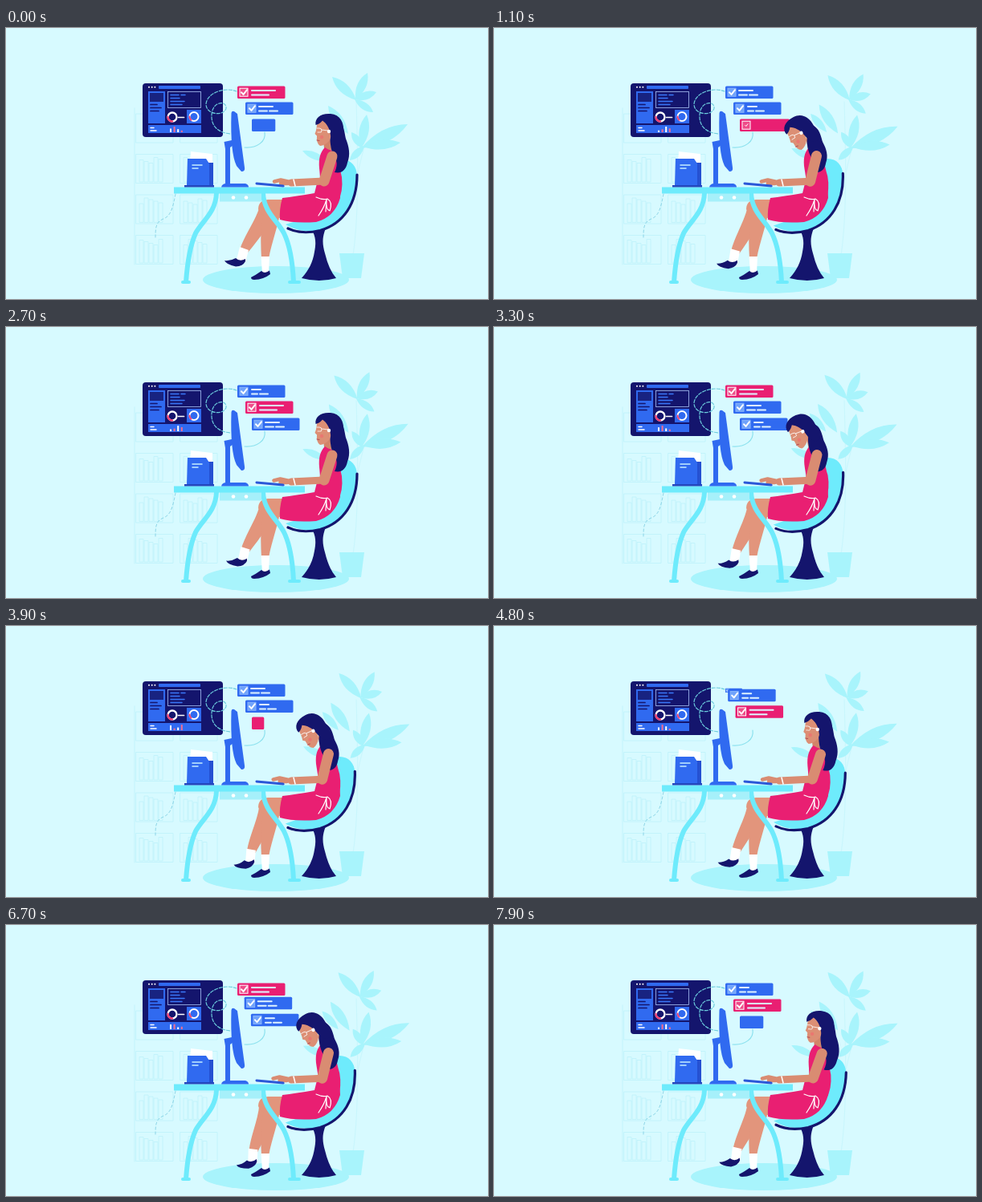
Recreate the animation shown at these times as an HTML page. Size 600 px wide and 338 px high, loop 8000 ms.

```html
<!DOCTYPE html>
<html lang="en">
<head>
<meta charset="utf-8">
<title>Working at a desk</title>
<style>
html, body { margin: 0; width: 100%; height: 100%; overflow: hidden; background: #d7faff; }
svg { display: block; width: 100vw; height: 100vh; }
.navy { fill: #14156d; }
.blue { fill: #306af0; }
.pink { fill: #e91f72; }
.skin { fill: #dc8f75; }
.shin { fill: #e2957c; }
.cyan { fill: #6eebfc; }
.pale { fill: #a8f4fc; }
.white { fill: #fff; }
.line { fill: none; stroke-linecap: round; stroke-linejoin: round; }
.limb { stroke: #d98c72; }
</style>
</head>
<body>
<svg viewBox="0 0 600 338" preserveAspectRatio="none">
  <g id="shelves" class="line" stroke="#bdf2fa" stroke-width=".8"></g>
  <path class="line" d="M211 207C208 222 206 234 196 238S186 250 186 264" stroke="#80cfe2" stroke-width=".9" stroke-dasharray="3 3"/>

  <!-- plant -->
  <ellipse class="pale" cx="336" cy="314" rx="91" ry="17"/>
  <path class="line" d="M432 284C438 240 439 190 436 92M434 200Q440 170 446 148" stroke="#c8f6fd"/>
  <path class="pale" d="M415 281h31l-4 31h-23z"/>
  <g id="topLeaves" class="pale"></g>
  <g id="lowLeaves" class="pale"></g>

  <!-- window -->
  <rect class="navy" x="170" y="69" width="100" height="67" rx="4"/>
  <g class="white"><circle cx="178" cy="73.700" r="1"/><circle cx="181.700" cy="73.700" r="1"/><circle cx="185.400" cy="73.700" r="1"/></g>
  <rect class="blue" x="190" y="72" width="52" height="4" rx="1"/>
  <rect class="blue" x="177" y="79" width="21" height="40"/>
  <rect x="179" y="81" width="17" height="11" fill="#182381"/>
  <path class="line" d="M180 95.500h8M180 99.500h13M180 103.500h10" stroke="#14156d" stroke-width="1.700"/>
  <rect class="navy" x="201.500" y="79.500" width="41" height="20" stroke="#a8c3f7" stroke-width=".8"/>
  <path class="line" d="M205 83.500h10M218 83.500h5M205 87.500h11M205 91.500h17M205 95.500h14" stroke="#3978fa" stroke-width="1.500"/>
  <g class="line" stroke-width="2.300">
    <circle cx="207" cy="111" r="5.500" stroke="#fff"/>
    <path d="M201.500 111a5.500 5.500 0 0 0 5.500 5.500" stroke="#f03b72"/>
    <path d="M214.500 111.500h7" stroke="#fff" stroke-width="1.700"/>
  </g>
  <rect class="blue" x="225" y="102" width="18" height="17"/>
  <circle cx="234" cy="110.500" r="5.500" class="line" stroke="#fff" stroke-width="2"/>
  <path class="line" d="M228.500 110.500a5.500 5.500 0 0 0 2 4.200" stroke="#f03b72" stroke-width="2"/>
  <rect class="blue" x="177" y="121" width="66" height="10"/>
  <path class="line" d="M180 124.500h4M180 128h7" stroke="#fff" stroke-width="1.500"/>
  <g id="bars"></g>

  <path class="line" d="M287 79C272 73 250 81 249 95C249 109 272 110 274 100C275 90 257 91 256 108C255 124 266 131 280 132" stroke="#6bcbdc" stroke-width="1.200" stroke-dasharray="4 2"/>
  <path class="line" d="M297 149C312 150 324 142 322 130" stroke="#8ce1ee" stroke-width="1.200"/>
  <g id="tasks"></g>

  <!-- chair and woman -->
  <path class="navy" d="M380 250H398C393 262 394 270 397 281Q402 302 411 312Q390 318 368 312C377 302 382 292 384 279C386 268 386 261 380 250Z"/>
  <g id="chair">
    <path class="cyan" d="M416 164C429 163 437 172 437 185C436 218 420 245 391 252C376 255 361 253 348 245L390 232Z"/>
    <path class="line" d="M437 183C437 219 420 244 391 252.500Q368 258 351 250" stroke="#14156d" stroke-width="3.200"/>
  </g>
  <g id="shin">
    <path class="shin" d="M316 222C311 240 298 256 291 276L301 280C316 262 327 248 332 230Z"/>
    <path class="white" d="M291 273L302 277L298 292L287 289Z"/>
    <path class="navy" d="M272 290Q279 291 286 287Q291 292 298 288V291Q295 297 286 297.500Q274 295 272 290Z"/>
  </g>
  <path class="shin" d="M346 214H326Q314 215 314 226Q318 236 330 235L346 238Z"/>
  <path class="shin" d="M322 226C316 248 317 268 318 288H327C330 270 337 252 341 232Z"/>
  <path class="white" d="M317.500 285H328L327 306H319Z"/>
  <path class="navy" d="M305 311Q311 308 318 303Q322 307 328 302.500L329 307Q321 313.500 309 314Q305 314 305 311Z"/>
  <path class="pink" d="M384 206Q360 210 344 212Q340 226 341 239Q358 244 386 242Q409 236 416 212L415 190L388 190Z"/>
  <g id="torso">
    <path class="line" d="M399 138L401 153" stroke="#d28469" stroke-width="9"/>
    <path class="pink" d="M397 149Q406 155 410 152C415 160 415 174 418 186Q420 204 413 217H385C393 202 391 185 390 175C389 163 391 155 397 149Z"/>
    <path id="tail" class="navy" d="M408 112C420 114 421 128 423 138C427 148 429 158 425 168C423 178 417 182 409 180Q413 172 411 165C405 158 402 140 404 130Z"/>
    <g id="head">
      <path class="skin" d="M389 113C386 122 387 127 384.500 132L387 134.500Q386 144 391 147Q397 147 403 140L407 126L400 113Z"/>
      <path class="navy" d="M385.500 121C384 112 392 106 404 107C416 108 421 118 420 129Q423 141 416 147C408 150 405 142 404 134C403 125 399 119 394 115.500Q390 120 385.500 121Z"/>
      <path class="line" d="M387 125h3q3 0 3 3t-3 2h-2M393 127L401 128" stroke="#fff" stroke-width=".8"/>
      <circle class="white" cx="402" cy="129" r="2.200"/>
      <path class="line" d="M387 140l3 .5" stroke="#b44b55"/>
      <circle cx="393" cy="136" r="2.200" fill="#ea7770"/>
    </g>
  </g>
  <path id="upperArm" class="line limb" stroke-width="13"/>
  <path id="foreArm" class="line limb" stroke-width="9"/>
  <path id="hand" class="line limb" d="M358 193L342 189.500L334 191.500M351 194H342" stroke-width="4.500"/>
  <path class="line" d="M358 189L360 197" stroke="#fff" stroke-width="1.500"/>
  <path class="line" d="M386 211Q395 215 400 213Q407 217 403 228Q398 227 399 214Q396 224 389 234M399 214L398 229" stroke="#fff" stroke-width="1.200"/>

  <!-- desk -->
  <path class="line" d="M262 206C261 230 245 240 236 256Q227 276 224 317M320 206C321 230 338 240 346 256Q356 276 358 317" stroke="#6eebfc" stroke-width="6" style="stroke-linecap:butt"/>
  <rect class="cyan" x="218" y="315" width="12" height="4" rx="2"/>
  <rect class="cyan" x="351" y="315" width="16" height="4" rx="2"/>
  <rect x="266" y="205" width="52" height="11.500" fill="#a6f0fa"/>
  <circle class="white" cx="283" cy="211.500" r="2.300"/><circle class="white" cx="299" cy="211.500" r="2.300"/>
  <rect class="cyan" x="209" y="198.500" width="163" height="8"/>
  <path class="white" d="M230 154L257 157V170H229Z"/>
  <path d="M250 168H258V197H250Z" fill="#2550d2"/>
  <path class="blue" d="M226 163H249L253 169V197H225Z"/>
  <rect x="222" y="196" width="37" height="2.500" fill="#2447bd"/>
  <path class="line" d="M232 171h12M232 175h7" stroke="#c4eeff" stroke-width="1.500"/>
  <path class="blue" d="M271.500 142L281 140L283 146L279 149V195H273V151Z"/>
  <path class="blue" d="M280.500 106Q281 103 284 104L288 107L297 174Q298 179 293 179L287 172Q279 156 280.500 106Z"/>
  <path class="blue" d="M268 198.500Q269 194 274 194H298Q302 195 302 198.500Z"/>
  <path class="line" d="M312 194L345 197" stroke="#2b58d8" stroke-width="3"/>
</svg>
<script>
const $ = id => document.getElementById(id);
const LOOP = 8000, STEP = 987.5, SHIFT = -255;
const clamp = v => Math.min(1, Math.max(0, v));
const smooth = v => (v = clamp(v), v * v * (3 - 2 * v));
const linear = v => v;
const set = (id, value, attr = 'transform') => $(id).setAttribute(attr, value);

// Interpolate through alternating times and values.
function key(t, list, ease = smooth) {
  if (t <= list[0]) return list[1];
  for (let i = 2; i < list.length; i += 2) {
    if (t <= list[i]) {
      const k = ease((t - list[i - 2]) / (list[i] - list[i - 2]));
      return list[i - 1] + (list[i + 1] - list[i - 1]) * k;
    }
  }
  return list[list.length - 1];
}

function leaf(x, y, tx, ty, w) {
  const d = Math.hypot(tx - x, ty - y), nx = (y - ty) / d * w, ny = (tx - x) / d * w;
  const mx = x + (tx - x) * .55, my = y + (ty - y) * .55;
  return `<path d="M${x} ${y}Q${mx + nx} ${my + ny} ${tx} ${ty}Q${mx - nx} ${my - ny} ${x} ${y}"/>`;
}
$('topLeaves').innerHTML = leaf(436, 90, 406, 61, 12) + leaf(435, 89, 450, 56, 11) +
  leaf(434, 89, 461, 80, 10) + leaf(434, 89, 457, 105, 9);
$('lowLeaves').innerHTML = leaf(442, 150, 449, 108, 12) + leaf(442, 150, 500, 120, 15) +
  leaf(444, 148, 491, 143, 12) + leaf(444, 150, 430, 130, 9) + leaf(446, 147, 428, 165, 9) +
  leaf(426, 132, 401, 97, 12) + leaf(412, 131, 391, 109, 9) + leaf(400, 166, 369, 153, 9);

function drawShelves() {
  let d = 'M160 100V295';
  for (let row = 0; row < 4; row++) for (let col = 0; col < 2; col++) {
    const x = 162 + col * 55, y = 107 + row * 50.5;
    d += `M${x} ${y}h46v36h-46z`;
    if (row) for (let b = 0; b < 5; b++) {
      const h = 22 + (b * 7 + row * 5 + col * 3) % 9;
      d += `M${x + 4 + b * 6} ${y + 34}v${-h}h5v${h}z`;
    }
  }
  $('shelves').innerHTML = `<path d="${d}"/>`;
}
drawShelves();

// Each line: start, end, height within a task.
const lines = [
  [[18, 29, 5.5], [18, 25, 11], [28, 38, 11]],
  [[18, 47, 5.5], [18, 39, 11]],
  [[17, 34, 5.5], [17, 27, 11], [30, 40, 11]]
];
const slots = [[306, 113.5], [298, 92.5], [288, 72.5]];

function task(index, slot, k, age) {
  const kind = (index % 3 + 3) % 3;
  const a = slots[Math.max(0, slot - 1)], b = slots[Math.min(2, slot)];
  const x = a[0] + (b[0] - a[0]) * k, y = a[1] + (b[1] - a[1]) * k;
  const out = slot > 2 ? 1 - smooth((k - .2) / .8) : 1;
  const width = slot ? 59.5 : key(age, [-105, 0, -50, 15, 0, 29, 113, 62, 220, 59.5], linear);
  const box = slot ? 1 : clamp((age - 50) / 60);
  const tick = slot ? 1 : clamp((age - 60) / 110);
  const text = slot ? 1 : smooth((age - 140) / 220);
  if (width <= 0 || out <= 0) return '';
  const [color, tint, edge] = kind === 1 ? ['pink', '#ee4b88', '#fff'] : ['blue', '#6fa2fb', '#8ab6fc'];
  let s = `<g transform="translate(${x} ${y + 8 * (1 - out)}) scale(${out})">` +
    `<rect class="${color}" width="${width}" height="15.5" rx="1.5"/>`;
  if (box) s += `<g transform="translate(8 7.700) scale(${box})">` +
    `<rect x="-5" y="-5" width="10" height="10" fill="${tint}" stroke="${edge}"/>` +
    `<path class="line" transform="scale(${tick})" d="M-3 0L-.5 2.700L4-3" stroke="#fff" stroke-width="2"/></g>`;
  if (text) for (const [from, to, h] of lines[kind])
    s += `<path class="line" d="M${from} ${h}H${from + (to - from) * text}" stroke="#dff3ff" stroke-width="2"/>`;
  return s + '</g>';
}

function drawTasks(t) {
  const n = Math.floor((t - SHIFT) / STEP), age = t - n * STEP;
  const k = smooth((age - SHIFT) / 190);
  let s = '';
  for (let slot = 3; slot >= 0; slot--) s += task(n - slot, slot, slot ? k : 0, age);
  $('tasks').innerHTML = s;
}

function turn(x, y, deg) {
  const a = deg * Math.PI / 180, dx = x - 398, dy = y - 225;
  return [398 + dx * Math.cos(a) - dy * Math.sin(a), 225 + dx * Math.sin(a) + dy * Math.cos(a)];
}

function drawWoman(t) {
  const pose = key(t % 2800, [100, 0, 600, -1, 1600, -1, 2200, .5, 2400, .5, 2650, 0]);
  const down = Math.max(0, -pose), lean = pose * 4;
  set('torso', `rotate(${lean} 398 225)`);
  set('head', `translate(${-3 * down} ${-down}) rotate(${-28 * down} 401 150)`);
  set('tail', `translate(${-8 * down} ${181 * .13 * down}) scale(1 ${1 - .13 * down})`);
  set('chair', `rotate(${pose * 2.2} 390 252)`);
  const shoulder = turn(406, 160, lean), elbow = turn(396, 191, lean);
  set('upperArm', `M${shoulder}L${elbow}`, 'd');
  set('foreArm', `M${elbow}L355 193`, 'd');
  set('hand', `translate(${-down + Math.sin(t / 90) * .6} 0)`);
  const foot = key(t, [0, 0, 1100, 5, 2700, 2, 3900, 11, 5700, 2, 6700, 14, 7900, 8]);
  set('shin', `rotate(${-foot * .88} 323 226)`);
}

function drawScene(t) {
  const sway = key(t, [0, 0, 1100, 1, 2700, .25, 3900, .9, 5700, .35, 6700, .8, 7900, 1]);
  set('topLeaves', `rotate(${sway * 4.5} 437 180)`);
  set('lowLeaves', `rotate(${sway * 2.5} 437 180)`);
  $('bars').innerHTML = [0, 1, 2, 3].map(i => {
    const h = 4.5 + 2.5 * Math.sin(t / 260 + i * 1.7);
    return `<rect x="${204 + i * 4.6}" y="${130 - h}" width="2" height="${h}" fill="${i % 2 ? '#f36b91' : '#fff'}"/>`;
  }).join('');
  drawTasks(t);
  drawWoman(t);
}

function frame() {
  drawScene(performance.now() % LOOP);
  requestAnimationFrame(frame);
}
frame();
</script>
</body>
</html>
```
